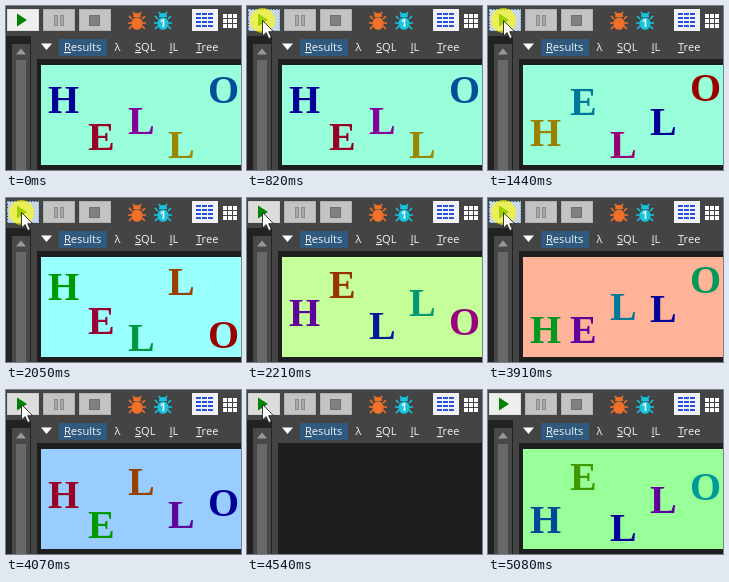
Write an HTML page that moves like this. It is 235x164 px and loops after 5480 ms.

```html
<!DOCTYPE html>
<html lang="en">
<head>
<meta charset="utf-8">
<title>Run button</title>
<style>
html, body { margin: 0; width: 100%; height: 100%; overflow: hidden; background: #444; }
svg { display: block; width: 235px; height: 164px; }
rect { shape-rendering: crispEdges; }
.tab { font: 11.1px "Open Sans", "Noto Sans", sans-serif; fill: #f4f4f4; }
.tab tspan { text-decoration: underline; }
#letters { font: bold 40px "Liberation Serif", "Times New Roman", serif; }
.badge { font: bold 11px "Open Sans", sans-serif; fill: #fff; text-anchor: middle; }
</style>
</head>
<body>
<svg viewBox="0 0 235 164">
  <defs>
    <g id="bug">
      <path d="M-5-2-8-5M-5 2H-9M-5 5-8 8M5-2 8-5M5 2H9M5 5 8 8M-2-6-4-9M2-6 4-9" fill="none" stroke="currentColor" stroke-width="1.6"/>
      <path d="M-4-4a4 4 0 0 1 8 0z" fill="currentColor"/>
      <ellipse cy="2.5" rx="5.6" ry="6.3" fill="currentColor"/>
    </g>
  </defs>

  <rect width="235" height="164" fill="#444"/>

  <!-- toolbar -->
  <rect id="run" x="1.5" y="3.5" width="31" height="21"/>
  <path d="M11 7.5v13l10-6.5z" fill="#008000"/>
  <g fill="#c3c3c3" stroke="#b0b0b0">
    <rect x="37.5" y="3.5" width="31" height="21"/>
    <rect x="73.5" y="3.5" width="31" height="21"/>
  </g>
  <g fill="#aaa" stroke="#8b8b8b">
    <rect x="48.5" y="9.5" width="3" height="10"/>
    <rect x="54.5" y="9.5" width="3" height="10"/>
    <rect x="83.5" y="9.5" width="10" height="10" fill="#808080" stroke="#707070"/>
  </g>
  <use href="#bug" x="131" y="15" color="#f07028"/>
  <use href="#bug" x="157" y="15" color="#16c4de"/>
  <text class="badge" x="157" y="21">1</text>
  <rect x="186" y="3" width="26" height="22" fill="#f0f2f6"/>
  <g id="rows" fill="#2450dc"></g>
  <g id="cells" fill="#fff"></g>

  <!-- editor scrollbar -->
  <rect y="30" width="25" height="134" fill="#222"/>
  <rect x="6" y="38" width="18" height="126" fill="#484848"/>
  <path d="M10 48.5h10l-5-6z" fill="#999"/>
  <rect x="10" y="54" width="10" height="110" fill="#686868"/>

  <!-- tabs -->
  <path d="M35 37.5h11l-5.5 6.5z" fill="#fff"/>
  <rect x="53" y="33" width="48" height="17" fill="#30597f"/>
  <g class="tab">
    <text x="58" y="45"><tspan>R</tspan>esults</text>
    <text x="108.500" y="45">λ</text>
    <text x="129" y="45"><tspan>S</tspan>QL</text>
    <text x="163.500" y="45"><tspan>I</tspan>L</text>
    <text x="190" y="45"><tspan>T</tspan>ree</text>
  </g>

  <!-- results -->
  <rect x="31" y="53" width="204" height="111" fill="#1e1e1e"/>
  <g id="panel">
    <rect id="back" x="35" y="59" width="200" height="100"/>
    <g id="letters"></g>
  </g>

  <circle id="glow" cx="15.500" cy="14.500" r="12.500" fill="#ff0" opacity=".62"/>
  <path id="cursor" d="M.5.5v15.500l3.600-3.400 2.700 6 2.500-1.100-2.600-5.800h4.900z" fill="#fff" stroke="#222" stroke-width=".9"/>
</svg>
<script>
const LOOP = 5480;
const $ = id => document.getElementById(id);

function add(parent, tag, attrs) {
  const el = document.createElementNS('http://www.w3.org/2000/svg', tag);
  set(el, attrs);
  parent.append(el);
  return el;
}
function set(el, attrs) {
  for (const k in attrs) el.setAttribute(k, attrs[k]);
}

for (let r = 0; r < 4; r++) {
  for (let c = 0; c < 3; c++) {
    add($('rows'), 'rect', {x: 190 + c * 6, y: 7 + r * 4, width: 5, height: 2});
    if (r < 3) add($('cells'), 'rect', {x: 217 + c * 5, y: 8 + r * 5, width: 4, height: 4});
  }
}
const letters = [...'HELLO'].map((ch, i) => {
  const el = add($('letters'), 'text', {x: 42 + i * 40});
  el.textContent = ch;
  return el;
});

// Each result: panel hue, letter baselines, letter hues
const results = [
  [158, [107, 144, 128, 152, 97], [240, 345, 293, 53, 210]],
  [158, [140, 109, 152, 129, 95], [50, 193, 315, 240, 0]],
  [180, [102, 136, 153, 97, 150], [120, 340, 145, 25, 0]],
  [95, [128, 100, 141, 118, 137], [277, 20, 230, 165, 310]],
  [85, [109, 105, 103, 153, 124], [0, 215, 155, 340, 120]],
  [16, [145, 145, 122, 124, 95], [133, 277, 193, 240, 155]],
  [210, [118, 148, 105, 138, 126], [345, 120, 25, 277, 240]],
  [120, [143, 100, 151, 123, 110], [212, 95, 240, 277, 180]]
];

// Each click: press, clear, show
const clicks = [
  [820, 900, 980], [1440, 1520, 1590], [2050, 2130, 2210], [2670, 2740, 2820],
  [3370, 3450, 3450], [3910, 3990, 4070], [4470, 4540, 4620]
];

const home = [15, 14];
const moves = [
  {times: [70, 150, 220, 300, 370, 450, 520, 590, 670],
   from: [137, 135], to: home, ease: u => 1 - (1 - u) ** 1.6},
  {times: [4620, 4700, 4770, 4850, 4920, 5000],
   from: home, to: [232, 161], ease: u => u ** 1.5}
];

function cursorAt(t) {
  if (t < 70 || t >= 5080) return null;
  const {times, from, to, ease} = moves[t < 4620 ? 0 : 1];
  const step = times.filter(s => s <= t).length - 1;
  const k = ease(step / (times.length - 1));
  return from.map((a, i) => Math.round(a + (to[i] - a) * k));
}

function show(el, on) {
  el.style.display = on ? '' : 'none';
}

function draw(t) {
  const shown = clicks.filter(c => c[2] <= t).length;
  const pressed = clicks.some(c => t >= c[0] && t < c[1]);
  const cleared = clicks.some(c => t >= c[1] && t < c[2]);
  const [hue, ys, hues] = results[shown];

  show($('panel'), !cleared);
  set($('back'), {fill: `hsl(${hue} 100% 80%)`});
  letters.forEach((el, i) => set(el, {y: ys[i], fill: `hsl(${hues[i]} 100% 30%)`}));

  const pos = cursorAt(t);
  show($('cursor'), pos);
  if (pos) set($('cursor'), {transform: `translate(${pos})`});

  const hover = pos && pos[0] < 33 && pos[1] < 25;
  set($('run'), {
    fill: pressed ? '#c9d6e4' : hover ? '#dcdcdc' : '#eee',
    stroke: pressed ? '#8fb8e0' : hover ? '#cfcfcf' : '#ddd',
    'stroke-dasharray': pressed ? '2 1' : 'none'
  });
  show($('glow'), pressed);
}

const start = performance.now();
function tick() {
  draw((performance.now() - start) % LOOP);
  requestAnimationFrame(tick);
}
tick();
</script>
</body>
</html>
```
